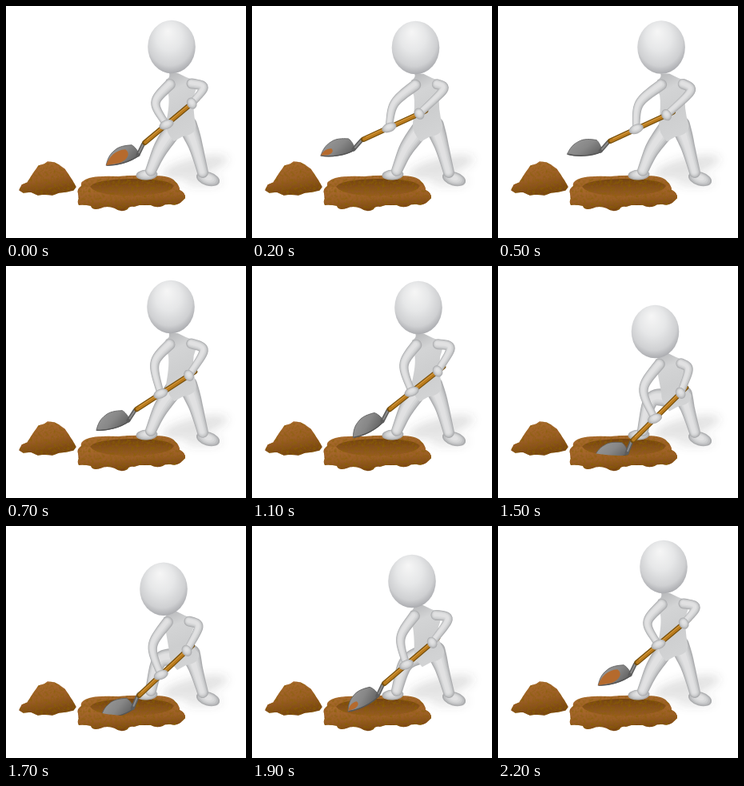
Recreate the animation shown at these times as an HTML page. Size 300 by 290 pixels, loop 2300 ms.

```html
<!DOCTYPE html>
<html lang="en">
<head>
<meta charset="utf-8">
<title>Digging figure</title>
<style>
  html, body { margin: 0; width: 100%; height: 100%; overflow: hidden; background: #fff; }
  svg { display: block; width: 300px; height: 290px; }
</style>
</head>
<body>
<svg viewBox="0 0 300 290">
  <defs>
    <radialGradient id="skull" cx=".48" cy=".42" r=".6" fx=".42" fy=".2">
      <stop offset="0" stop-color="#f6f6f6"/>
      <stop offset=".45" stop-color="#e6e7e8"/>
      <stop offset=".8" stop-color="#cfd0d2"/>
      <stop offset="1" stop-color="#a6a7ab"/>
    </radialGradient>
    <linearGradient id="trunk" x2=".25" y2="1">
      <stop offset="0" stop-color="#b4b5b7"/>
      <stop offset=".3" stop-color="#d3d4d5"/>
      <stop offset=".65" stop-color="#cdcecf"/>
      <stop offset="1" stop-color="#d2d3d4"/>
    </linearGradient>
    <linearGradient id="soil" x2=".3" y2="1">
      <stop offset="0" stop-color="#ac6d30"/>
      <stop offset=".6" stop-color="#9a5d26"/>
      <stop offset="1" stop-color="#7a4614"/>
    </linearGradient>
    <linearGradient id="pit" x2="0" y2="1">
      <stop offset="0" stop-color="#744312"/>
      <stop offset="1" stop-color="#975c25"/>
    </linearGradient>
    <linearGradient id="steel" x2="1" y2=".7">
      <stop offset="0" stop-color="#9c9c9c"/>
      <stop offset=".6" stop-color="#878787"/>
      <stop offset="1" stop-color="#666"/>
    </linearGradient>
    <filter id="grain" x="-5%" y="-5%" width="110%" height="110%">
      <feTurbulence type="fractalNoise" baseFrequency=".3" numOctaves="3" seed="4"/>
      <feColorMatrix values="0 0 0 0 .25  0 0 0 0 .12  0 0 0 0 0  1.8 0 0 0 -.75"/>
      <feComposite in2="SourceGraphic" operator="in" result="specks"/>
      <feMerge><feMergeNode in="SourceGraphic"/><feMergeNode in="specks"/></feMerge>
    </filter>
    <filter id="soft" x="-50%" y="-80%" width="200%" height="260%"><feGaussianBlur stdDeviation="6"/></filter>
    <filter id="blend" x="-10%" y="-10%" width="120%" height="120%"><feGaussianBlur stdDeviation=".6"/></filter>
  </defs>

  <g filter="url(#soft)" fill="#555">
    <ellipse cx="236" cy="201" rx="42" ry="11" opacity=".16" transform="rotate(-14 236 201)"/>
    <ellipse cx="246" cy="219" rx="24" ry="6" opacity=".14"/>
  </g>
  <g filter="url(#grain)" stroke-linejoin="round">
    <path fill="url(#soil)" stroke="url(#soil)" stroke-width="1.5" d="M17 230L20 224L27 221L34 210L41 200L48 198L52 195L60 196L66 199L73 204L79 213L83 219L87 226L84 230L75 232L66 233L58 236L47 235L40 236L31 232L22 233Z"/>
    <path fill="url(#soil)" d="M90 234Q88 229 94 225Q92 219 104 215Q115 212 140 213Q160 211 185 212Q206 212 211 219Q217 224 217 230Q224 233 224 240L216 247L190 249L110 249L91 245Z"/>
    <path fill="url(#pit)" d="M105 226Q110 217 156 216Q204 216 210 225Q205 236 157 237Q113 237 105 226Z"/>
  </g>
  <g id="legs" filter="url(#blend)"></g>
  <g id="shovel">
    <g id="blade">
      <path fill="url(#steel)" stroke="#5f5f5f" stroke-width=".8" d="M2 1C1 -6 -1 -11 -4 -14C-12 -16 -20 -17 -26 -14C-34 -11 -38 -6 -42 1C-30 5 -12 6 2 1Z"/>
      <path fill="none" stroke="#555" stroke-width="1.4" d="M-41 1C-30 5 -12 6 1 1"/>
      <path id="load" fill="#b56a2d" d="M-42 1C-36 -8 -25 -14 -13 -11C-8 -4 -14 2 -25 3Z"/>
    </g>
    <g id="shaft"></g>
  </g>
  <path filter="url(#grain)" fill="url(#soil)" d="M90 234Q94 225 105 226Q113 237 157 237Q205 236 210 225Q217 224 217 230Q224 233 224 240L218 246Q212 250 206 248Q200 246 196 250Q188 253 181 249Q170 247 160 251Q154 250 152 254Q144 259 136 253Q126 249 118 253Q108 256 106 250Q98 248 91 249Q88 243 92 240Z"/>
  <g id="clods" fill="#9a5823"></g>
  <g id="arms" filter="url(#blend)"></g>
  <ellipse id="head" rx="29.8" ry="33.3" fill="url(#skull)"/>
</svg>
<script>
const LOOP = 2300, STEP = 100;
const $ = id => document.getElementById(id);

// time, head x y, left elbow x y, right elbow x y, grip x y, socket x y, blade angle, load
const POSES = [
  [0,    207, 51, 187, 121, 247, 102, 239, 116, 165, 186, -17, 1],
  [200,  204.5, 52, 178, 122, 239, 105, 217, 131, 127, 179, -10, .5],
  [350,  203, 52, 171, 122, 236, 107, 207, 132, 112, 173, 2, 0],
  [700,  206, 51, 186, 122, 247, 106, 236, 132, 153, 193, -16, 0],
  [1100, 208, 52, 190, 124, 248, 103, 239, 126, 163, 194, -28, 0],
  [1500, 196.5, 82, 182, 154, 238, 130, 235, 152, 161, 234, -8, 0],
  [1900, 200, 69, 186, 140, 245, 117, 232, 140, 157, 212, -27, .5],
  [2200, 207, 51, 187, 121, 247, 102, 239, 116, 165, 186, -17, 1]
];

const mix = (a, b, u) => a.map((v, i) => v + (b[i] - v) * u);
const offset = (p, x, y) => [p[0] + x, p[1] + y];
const pair = p => p.map(v => v.toFixed(2)).join(' ');

function keyAt(i) {
  const n = POSES.length - 1, turn = Math.floor(i / n);
  if (i === n) return POSES[n];
  const key = POSES[i - turn * n].slice();
  key[0] += turn * LOOP;
  return key;
}

// Hermite curve through the poses; the last pose rests until the loop restarts.
function poseAt(t) {
  const last = POSES.length - 1;
  if (t >= POSES[last][0]) return POSES[last].slice(1);
  const i = POSES.findIndex((p, k) => t < POSES[k + 1][0]);
  const [a, b, c, d] = [-1, 0, 1, 2].map(k => keyAt(i + k));
  const span = c[0] - b[0], u = (t - b[0]) / span;
  return b.map((v, k) => {
    const m0 = (c[k] - a[k]) / (c[0] - a[0]) * span;
    const m1 = (d[k] - v) / (d[0] - b[0]) * span;
    const e = c[k] - v;
    return v + u * (m0 + u * (3 * e - 2 * m0 - m1 + u * (m0 + m1 - 2 * e)));
  }).slice(1);
}

// Tapered tube: a cubic whose two controls coincide, so that it passes through the joint.
function tube(a, joint, b, radii, scale) {
  const ctrl = joint.map((v, i) => v * 4 / 3 - (a[i] + b[i]) / 6);
  const left = [], right = [];
  for (let k = 0; k <= 16; k++) {
    const u = k / 16;
    const p = mix(mix(a, ctrl, u), ctrl, u), q = mix(ctrl, mix(ctrl, b, u), u);
    const c = mix(p, q, u), dx = q[0] - p[0], dy = q[1] - p[1];
    const r = (u < .5 ? radii[0] + (radii[1] - radii[0]) * u * 2
                      : radii[1] + (radii[2] - radii[1]) * (u * 2 - 1)) * scale / Math.hypot(dx, dy);
    const shift = (scale - 1) * 1.5;
    left.push(pair(offset(c, -dy * r + shift, dx * r + shift)));
    right.unshift(pair(offset(c, dy * r + shift, -dx * r + shift)));
  }
  const [r0, , r2] = radii.map(r => r * scale);
  return `M${left.join('L')}A${r2} ${r2} 0 0 0 ${right.join('L')}A${r0} ${r0} 0 0 0 ${left[0]}Z`;
}

const SHADES = [[1, '#acadaf'], [.87, '#bfc0c2'], [.72, '#cecfd0'], [.56, '#d8d9da'], [.36, '#e1e1e2']];
const limb = (...args) => SHADES.map(([s, c]) => `<path fill="${c}" d="${tube(...args, s)}"/>`).join('');
const pad = ([x, y], rx, ry, turn) => SHADES.map(([s, c]) =>
  `<ellipse rx="${rx * s}" ry="${ry * s}" fill="${c}" transform="translate(${x} ${y + (s - 1) * 2}) rotate(${turn})"/>`).join('');
const stroke = (a, b, color, width) =>
  `<path d="M${pair(a)}L${pair(b)}" stroke="${color}" stroke-width="${width}" stroke-linecap="round"/>`;

function trunk(chest, hip) {
  const c = (x, y) => pair(offset(chest, x, y)), h = (x, y) => pair(offset(hip, x, y));
  return `<path fill="url(#trunk)" d="M${c(-14, -14)}Q${c(-12, -9)} ${c(-18, -6)}Q${c(-20, 4)} ${c(-15, 13)}
    Q${c(-13, 24)} ${h(-19, 0)}Q${h(-20, 12)} ${h(-9, 23)}L${h(2, 17)}Q${h(20, 14)} ${h(18, 2)}
    Q${c(15, 28)} ${c(17, 14)}Q${c(22, 2)} ${c(18, -5)}Q${c(8, -8)} ${c(-3, -14)}Z"/>`;
}

// The steel neck leans away from the line between grip and socket.
function neckOf(grip, socket) {
  const lean = Math.atan2(grip[1] - socket[1], grip[0] - socket[0]) - .36;
  return offset(socket, 15 * Math.cos(lean), 15 * Math.sin(lean));
}

function drawShovel(grip, neck, socket, angle, load) {
  const at = u => mix(grip, neck, u);
  $('shaft').innerHTML =
    stroke(neck, socket, '#5c5c5c', 5) + stroke(neck, mix(neck, socket, .8), '#8b8b8b', 2) +
    stroke(grip, at(.97), '#76500f', 6.6) + stroke(grip, at(.96), '#b97a1c', 4.2) +
    stroke(offset(at(.1), -.5, -1), offset(at(.92), -.5, -1), '#d0953a', 1.2);
  $('blade').setAttribute('transform', `translate(${pair(socket)}) rotate(${angle})`);
  const s = Math.max(0, Math.min(1, load));
  $('load').setAttribute('transform', `translate(${-41 * (1 - s)} 0) scale(${s})`);
}

function drawClods(t) {
  const u = (t - 200) / 300;
  let out = '';
  if (u > 0 && u < 1) for (let i = 0; i < 7; i++) {
    const spread = Math.sin(i * 2.4) * 10 * u;
    const x = 91 - 39 * u + spread + i % 3;
    const y = 180 - 28 * u + 46 * u * u + Math.cos(i * 2.4) * 6 * u;
    out += `<circle cx="${x}" cy="${y}" r="${2 + i % 3}"/>`;
  }
  $('clods').innerHTML = out;
}

function draw(t) {
  const [hx, hy, lx, ly, rx, ry, gx, gy, sx, sy, angle, load] = poseAt(t);
  const dx = hx - 207, dy = hy - 51;
  const chest = [218 + dx * .3, 98 + dy * .8], hip = [219 - dx * .4, 146 + dy * .4];
  const grip = [gx, gy], socket = [sx, sy], neck = neckOf(grip, socket);
  const rightHand = mix(grip, neck, .1), leftHand = mix(grip, neck, .57);

  $('legs').innerHTML =
    pad([252.5, 216], 15, 8.5, 17) +
    limb(offset(hip, 8, 3), [237, 175 + dy * .1], [246, 208], [12, 9, 7]) +
    pad([176, 211], 13.5, 6.5, -4) +
    limb(offset(hip, -9, 7), [193 - dy * .05, 179 - dy * .36], [181, 206], [11.5, 9.5, 7]) +
    trunk(chest, hip);
  drawShovel(grip, neck, socket, angle, load);
  $('arms').innerHTML =
    limb(offset(chest, 14, -1), [rx, ry], rightHand, [6.5, 5.8, 4.6]) +
    pad(rightHand, 7.5, 6, 60) +
    limb(offset(chest, -13, 0), [lx, ly], leftHand, [7, 5.8, 4.6]) +
    pad(leftHand, 9.5, 5.8, -22);
  $('head').setAttribute('cx', hx);
  $('head').setAttribute('cy', hy);
  drawClods(t);
}

const start = performance.now();
function tick() {
  const t = (performance.now() - start) % LOOP;
  draw(Math.floor(t / STEP) * STEP);
  requestAnimationFrame(tick);
}
tick();
</script>
</body>
</html>
```
